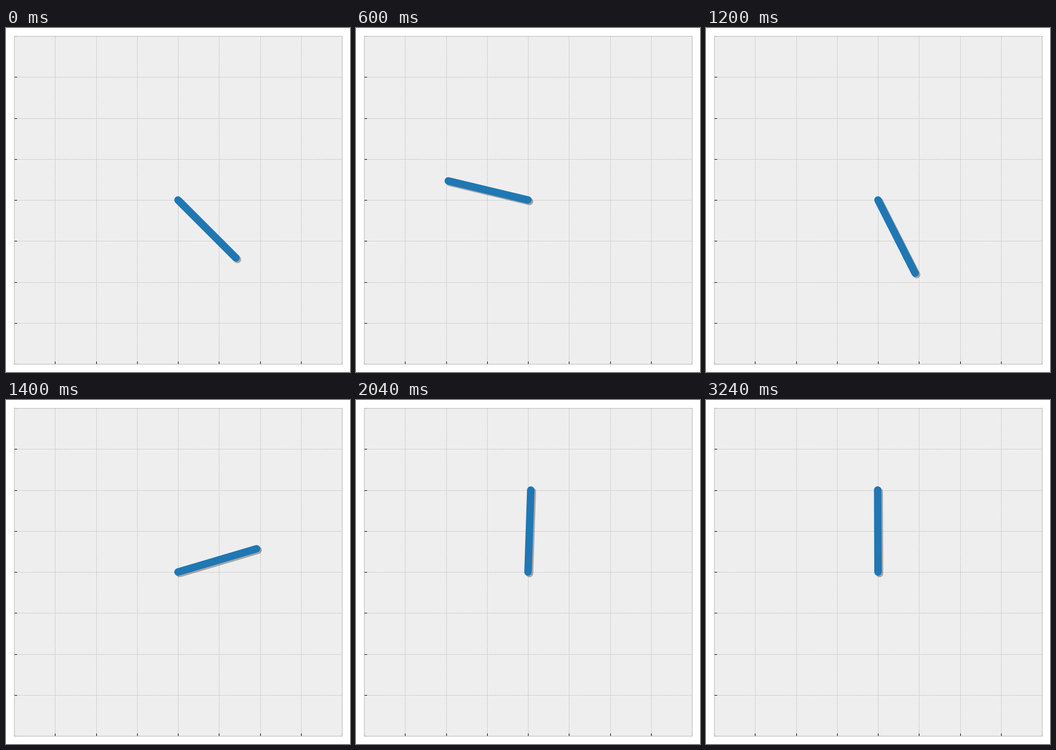
Recreate the animation shown at these times as a matplotlib script. Size 640 by 640 pixels, loop 8000 ms.

```python
import numpy as np
import matplotlib.pyplot as plt
from matplotlib.animation import FuncAnimation
from matplotlib.patheffects import Normal, SimpleLineShadow

STEP = 40          # ms per frame
FRAMES = 200
LENGTH = 2.0
T_STOP = 3.24      # seconds until the rod rests

# Swing-up: time, angle from hanging (rad), angular speed
KNOTS = [
    (0.000, np.pi / 4, -2.0),
    (0.320, -0.686, -5.3),
    (0.743, -1.980, 0.0),
    (0.920, -1.604, 4.3),
    (1.200, 0.4695, 8.8),
    (1.600, 2.632, 2.65),
    (1.680, 2.8187, 2.0),
]


def hermite(a, b, t):
    (t0, p0, v0), (t1, p1, v1) = a, b
    h = t1 - t0
    s = (t - t0) / h
    blend = s * s * (3 - 2 * s)
    bend = s * (1 - s) * (v0 * (1 - s) - v1 * s)
    return p0 + (p1 - p0) * blend + h * bend


def angle(t):
    t = min(t, T_STOP)
    for a, b in zip(KNOTS, KNOTS[1:]):
        if t <= b[0]:
            return hermite(a, b, t)
    # settle upright with a slight drift
    t0, p0, v0 = KNOTS[-1]
    gap = np.pi - p0
    drift = 0.0038 * (t - t0) / (T_STOP - t0)
    return np.pi - gap * np.exp(-v0 / gap * (t - t0)) + drift


plt.rcParams.update({
    "axes.facecolor": "#eeeeee",
    "axes.edgecolor": "#bcbcbc",
    "axes.axisbelow": True,
    "grid.color": "#b2b2b2",
    "grid.linestyle": "--",
    "grid.linewidth": 0.5,
    "xtick.direction": "in",
    "ytick.direction": "in",
})

fig = plt.figure(figsize=(6.4, 6.4), dpi=100, facecolor="white")
pad = 15 / 640
ax = fig.add_axes([pad, pad, 1 - 2 * pad, 1 - 2 * pad])
ax.set(xlim=(-4, 4), ylim=(-4, 4), xticks=range(-4, 5), yticks=range(-4, 5))
ax.tick_params(labelbottom=False, labelleft=False)
ax.grid(True)

rod, = ax.plot([], [], color="#1f77b4", lw=10, solid_capstyle="round",
               path_effects=[SimpleLineShadow(), Normal()])


def draw(i):
    th = angle(i * STEP / 1000)
    rod.set_data([0, LENGTH * np.sin(th)], [0, -LENGTH * np.cos(th)])
    return rod,


anim = FuncAnimation(fig, draw, frames=FRAMES, init_func=lambda: draw(0),
                     interval=STEP, repeat=True, repeat_delay=0)
plt.show()
```
